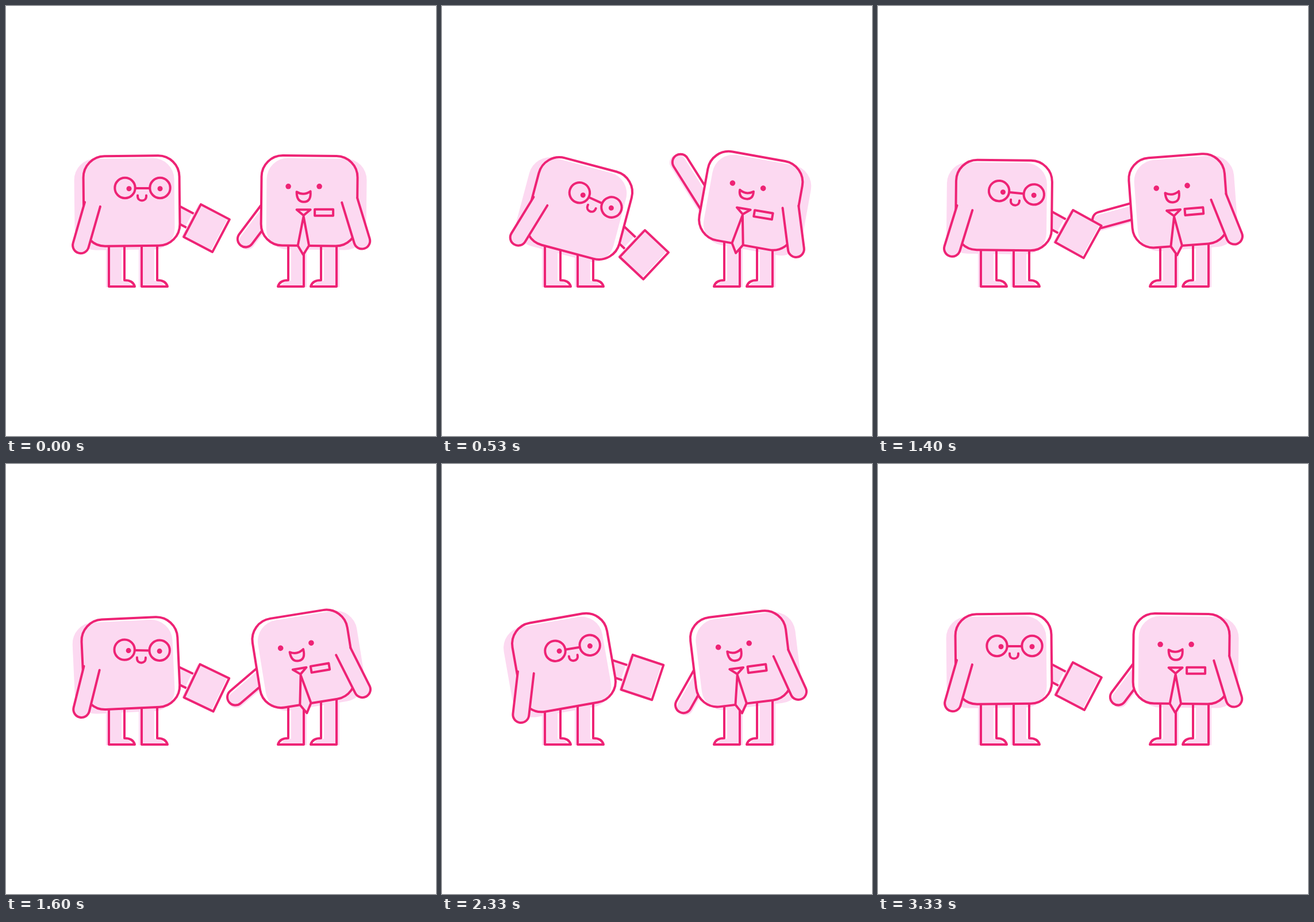
An HTML page with a canvas for the animation above (5.07 s loop, 748 px wide and 748 px high).

```html
<!DOCTYPE html>
<html lang="en">
<head>
<meta charset="utf-8">
<title>Two block people</title>
<style>
  html, body { margin: 0; width: 100%; height: 100%; overflow: hidden; background: #fff; }
  canvas { display: block; width: 100vmin; height: 100vmin; }
</style>
</head>
<body>
<canvas id="stage" width="748" height="748"></canvas>
<script>
const ctx = document.getElementById('stage').getContext('2d');
const LINE = '#ee2375', PINK = '#fcd9f1';
const LOOP = 5070, LAST_STEP = 31;

// Keys are [step, ...values]; values ease in and out between keys.
const LEFT_BODY = [   // tilt, x shift, y shift
  [0, 0, 0, 0], [5, 15.5, 20, 13], [14, 1.2, 0.5, 7.5], [20, -11.8, -8.2, 8.2], [30, 0, 0, 0]
];
const LEFT_FACE = [[0, 0], [5, 9], [10, 6.2], [22, 0]];   // extra tilt
const RIGHT_BODY = [[0, 0, -53], [5.7, 10, 52], [20.5, -15, -53], [25.5, 0, -53]];   // tilt, arm angle
const RIGHT_REACH = [[0, -67, 18], [5.7, -84, 14], [15, -66, 18]];   // shoulder x, mouth depth

function sample(keys, step) {
  const next = keys.findIndex(key => key[0] > step);
  if (next < 0) return keys[keys.length - 1].slice(1);
  const a = keys[next - 1], b = keys[next];
  const ease = (1 - Math.cos(Math.PI * (step - a[0]) / (b[0] - a[0]))) / 2;
  return a.slice(1).map((value, i) => value + (b[i + 1] - value) * ease);
}

function placed(x, y, degrees, draw) {
  ctx.save();
  ctx.translate(x, y);
  ctx.rotate(degrees * Math.PI / 180);
  draw();
  ctx.restore();
}

function fill(path, color = PINK, dx = 0, dy = 0) {
  ctx.save();
  ctx.translate(dx, dy);
  ctx.fillStyle = color;
  ctx.fill(path);
  ctx.restore();
}

function inked(data, filled = true) {
  const path = new Path2D(data);
  if (filled) fill(path);
  ctx.stroke(path);
}

function roundRect(x, y, w, h, r) {
  const path = new Path2D();
  path.roundRect(x, y, w, h, r);
  return path;
}

function circle(x, y, r, solid) {
  ctx.beginPath();
  ctx.arc(x, y, r, 0, 2 * Math.PI);
  if (solid) { ctx.fillStyle = LINE; ctx.fill(); } else ctx.stroke();
}

const SHELL = roundRect(-83.5, -78.3, 167, 156.6, 37);
const SHADE = roundRect(-87, -79.5, 174, 159, 37);
const LEG = new Path2D('M206 398V477Q221 477 224 488H179V398');
const ARM = 'M-14 0V74A14 14 0 0 0 14 74V0';
const BACK_ARM = new Path2D('M95 -14H0A14 14 0 0 0 0 14H95');
const SHEET = new Path2D('M-28.2 -32H28.2V32H-28.2Z');

function legs(mirror) {
  ctx.save();
  if (mirror) { ctx.translate(754, 0); ctx.scale(-1, 1); }
  for (let i = 0; i < 2; i++) {
    fill(LEG, PINK, -5, 1);
    ctx.stroke(LEG);
    ctx.translate(57, 0);
  }
  ctx.restore();
}

function person({ x, y, tilt, side, behind, front }) {
  const shade = () => fill(SHADE, PINK, side * 12.5, 5.5);
  const skew = side * 0.6;   // the hand-drawn shell is not quite level
  placed(x, y, tilt + skew, shade);
  legs(side > 0);
  placed(x, y, tilt, behind);
  placed(x, y, tilt + skew, () => {
    fill(SHELL, '#fff');
    ctx.save();
    ctx.clip(SHELL);
    shade();
    ctx.restore();
    ctx.stroke(SHELL);
  });
  placed(x, y, tilt, front);
}

function armWithSheet() {
  placed(130.5, 47.5, 27.7, () => {
    fill(new Path2D('M-75 -12H-33V15.5H-75Z'), PINK, -1, 1);
    inked('M-75 -12H-32M-75 15.5H-32', false);
    fill(SHEET, '#fff');
    fill(SHEET, PINK, -3.5, 2);
    ctx.stroke(SHEET);
  });
}

function glassesFace() {
  circle(-30.5, 0, 17.7);
  circle(30.5, 0, 17.7);
  inked('M-12.5 0.5H12.5M-8.5 13V14.5C-8.5 24.5 6.5 24.5 6.5 14.5V13', false);
  circle(-23.5, 1.3, 4.5, true);
  circle(30.5, 1.3, 4.5, true);
}

function tieFront(mouthDepth) {
  const chin = mouthDepth - 16;
  circle(-36.5, -25, 4.8, true);
  circle(17.5, -25, 4.8, true);
  inked(`M-22 -15.5Q-10 -8 2 -16.5Q3.5 ${chin} -9.5 ${chin}Q-22 ${chin} -22 -15.5Z`);
  inked('M-22 15.5H2L-10 25.5Z');
  inked('M-10 27L-20 78L-10.5 94L-0.5 78Z');
  inked('M9.5 15H41.5V26H9.5Z');
}

function draw(step) {
  ctx.fillStyle = '#fff';
  ctx.fillRect(0, 0, 748, 748);
  ctx.strokeStyle = LINE;
  ctx.lineWidth = 4;
  ctx.lineCap = ctx.lineJoin = 'round';

  const [lean, wave] = sample(RIGHT_BODY, step);
  const [shoulder, mouthDepth] = sample(RIGHT_REACH, step);
  person({
    x: 527.6 + lean, y: 338.8, tilt: lean, side: 1,
    behind() {
      placed(shoulder, 8.5, wave, () => {
        ctx.translate(-72.7, 0);
        fill(BACK_ARM, PINK, -2, 4.5);
        ctx.stroke(BACK_ARM);
      });
    },
    front() {
      placed(70, -1, -17, () => inked(ARM));
      tieFront(mouthDepth);
    }
  });

  const [tilt, dx, dy] = sample(LEFT_BODY, step);
  const [faceTilt] = sample(LEFT_FACE, step);
  person({
    x: 218.5 + dx, y: 339 + dy, tilt, side: -1,
    behind: armWithSheet,
    front() {
      placed(-68, 6, 16, () => inked(ARM));
      placed(16, 8, faceTilt, () => placed(3, -30.5, 0, glassesFace));
    }
  });
}

// Steps alternate between 130 ms and 70 ms, then the last pose holds.
function tick() {
  const t = performance.now() % LOOP;
  const step = 2 * Math.floor(t / 200) + (t % 200 >= 130 ? 1 : 0);
  draw(Math.min(step, LAST_STEP));
  requestAnimationFrame(tick);
}
tick();
</script>
</body>
</html>
```
